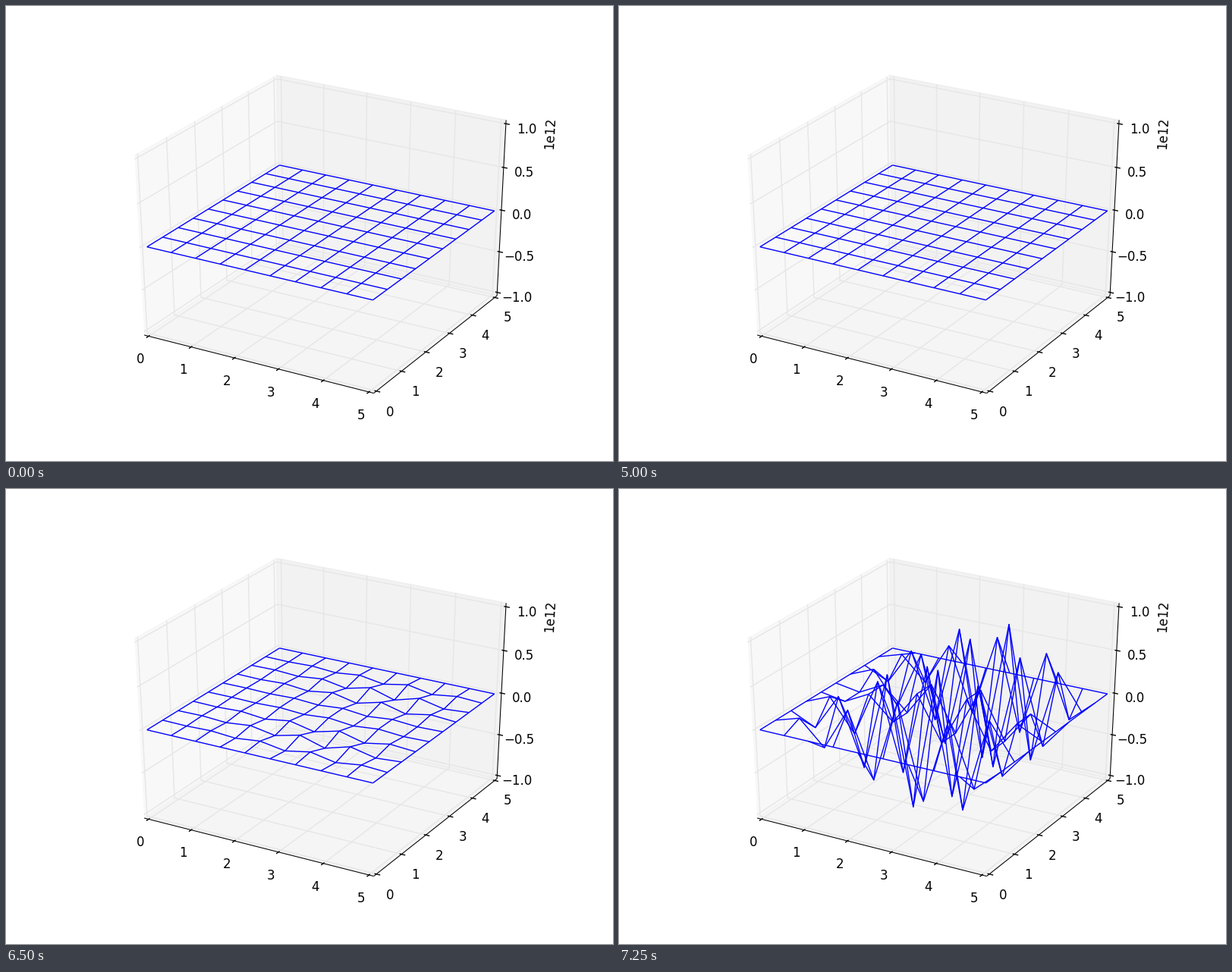
These frames come from a looping animation (800x600 px, 7.5 s). A matplotlib script:

```python
import numpy as np
import matplotlib.pyplot as plt
from matplotlib.animation import FuncAnimation
from matplotlib.collections import LineCollection
from matplotlib.patches import Polygon

FRAMES, INTERVAL = 30, 250
N = 10                     # nodes per side of the membrane
LO, HI = -1 / 48, 1 + 1 / 48   # box walls, in unit-cube coordinates
DELTA = 1 / 12
LABEL_GAP = 8 / 11 * DELTA

plt.rcParams["font.family"] = "DejaVu Sans"
plt.rcParams["font.size"] = 12

fig = plt.figure(figsize=(8, 6), dpi=100, facecolor="white")
ax = fig.add_axes([0, 0, 1, 1])
ax.set_xlim(0, 800)
ax.set_ylim(600, 0)
ax.axis("off")

# Camera at distance 10, elevation 30, azimuth -60
ELEV, AZIM, DIST = np.radians(30), np.radians(-60), 10
TOWARD = np.array([np.cos(AZIM) * np.cos(ELEV), np.sin(AZIM) * np.cos(ELEV), np.sin(ELEV)])
RIGHT = np.array([-np.sin(AZIM), np.cos(AZIM), 0])
UP = np.cross(TOWARD, RIGHT)


def project(points):
    """Unit-cube points (..., 3) to stage pixels (..., 2)."""
    p = np.asarray(points, float) - 0.5
    depth = DIST - p @ TOWARD
    x = 100 + 620 * (p @ RIGHT / depth + 0.095) / 0.185
    y = 540 - 480 * (p @ UP / depth + 0.095) / 0.185
    return np.stack([x, y], axis=-1)


def path(points, color, width, zorder):
    x, y = project(points).T
    ax.plot(x, y, color=color, lw=width, zorder=zorder, solid_capstyle="butt")


def label(point, text):
    x, y = project(point)
    ax.text(x, y + 1, text, ha="center", va="top", zorder=4)


def pane(corners, gray):
    color = (gray, gray, gray, 0.5)
    ax.add_patch(Polygon(project(corners), closed=False, fc=color, ec=color, lw=1, zorder=1))


pane([(LO, LO, LO), (LO, HI, LO), (LO, HI, HI), (LO, LO, HI)], 0.95)
pane([(HI, HI, LO), (LO, HI, LO), (LO, HI, HI), (HI, HI, HI)][1::-1]
     + [(HI, HI, HI), (LO, HI, HI)], 0.90)
pane([(LO, LO, LO), (HI, LO, LO), (HI, HI, LO), (LO, HI, LO)], 0.925)

GRID = (0.9, 0.9, 0.9)
TICK_IN, TICK_OUT = 0.1 * DELTA, 0.2 * DELTA
FAR, NEAR = HI + LABEL_GAP, LO - LABEL_GAP

for n in range(6):
    t = n / 5
    path([(t, LO, LO), (t, HI, LO), (t, HI, HI)], GRID, 1, 2)
    path([(HI, t, LO), (LO, t, LO), (LO, t, HI)], GRID, 1, 2)
    path([(t, LO + TICK_IN, LO), (t, LO - TICK_OUT, LO)], "black", 1, 3)
    path([(HI - TICK_IN, t, LO), (HI + TICK_OUT, t, LO)], "black", 1, 3)
    label((t, NEAR, NEAR), str(n))
    label((FAR, t, NEAR), str(n))

for n in range(5):
    t = n / 4
    path([(HI, HI, t), (LO, HI, t), (LO, LO, t)], GRID, 1, 2)
    path([(HI - TICK_IN, HI, t), (HI + TICK_OUT, HI, t)], "black", 1, 3)
    label((FAR, FAR, t), f"{2 * t - 1:.1f}".replace("-", "\u2212"))

path([(LO, LO, LO), (HI, LO, LO)], "black", 0.75, 3)
path([(HI, LO, LO), (HI, HI, LO)], "black", 0.75, 3)
path([(HI, HI, LO), (HI, HI, HI)], "black", 0.75, 3)
ax.text(717, 168, "1e12", rotation=87, ha="center", va="center", zorder=4)

# Unstable wave scheme: every mode flips sign and grows at each time step
COURANT_SQ = 0.688
FINAL_AMPLITUDES = {8: 0.767, 7: -0.211, 6: 0.0115}   # by x mode, y mode is 7
Y_MODE = 7
index = np.arange(N)
grid_x, grid_y = np.meshgrid(index / (N - 1), index / (N - 1), indexing="ij")


def stiffness(mode):
    return 4 * np.sin(mode * np.pi / (2 * (N - 1))) ** 2


def growth(mode):
    half = 1 - COURANT_SQ * (stiffness(mode) + stiffness(Y_MODE)) / 2
    return half - np.sqrt(half ** 2 - 1)


def shape(mode):
    return np.sin(mode * np.pi * index / (N - 1))


def height(step):
    profile = sum(a * growth(m) ** (step - FRAMES + 1) * shape(m)
                  for m, a in FINAL_AMPLITUDES.items())
    # Both factors carry the alternating node sign
    return np.outer(profile, shape(Y_MODE))


FLIP = np.sign(height(FRAMES - 1)[1, 1])   # first inner node ends above the plane
wire = LineCollection([], colors="blue", linewidths=1, zorder=5)
ax.add_collection(wire)


def update(step):
    z = 0.5 + FLIP * height(step) / 2
    nodes = project(np.stack([grid_x, grid_y, z], axis=-1))
    wire.set_segments([*nodes, *nodes.swapaxes(0, 1)])
    return [wire]


anim = FuncAnimation(fig, update, frames=FRAMES, interval=INTERVAL, repeat=True,
                     repeat_delay=0, blit=False)
plt.show()
```
